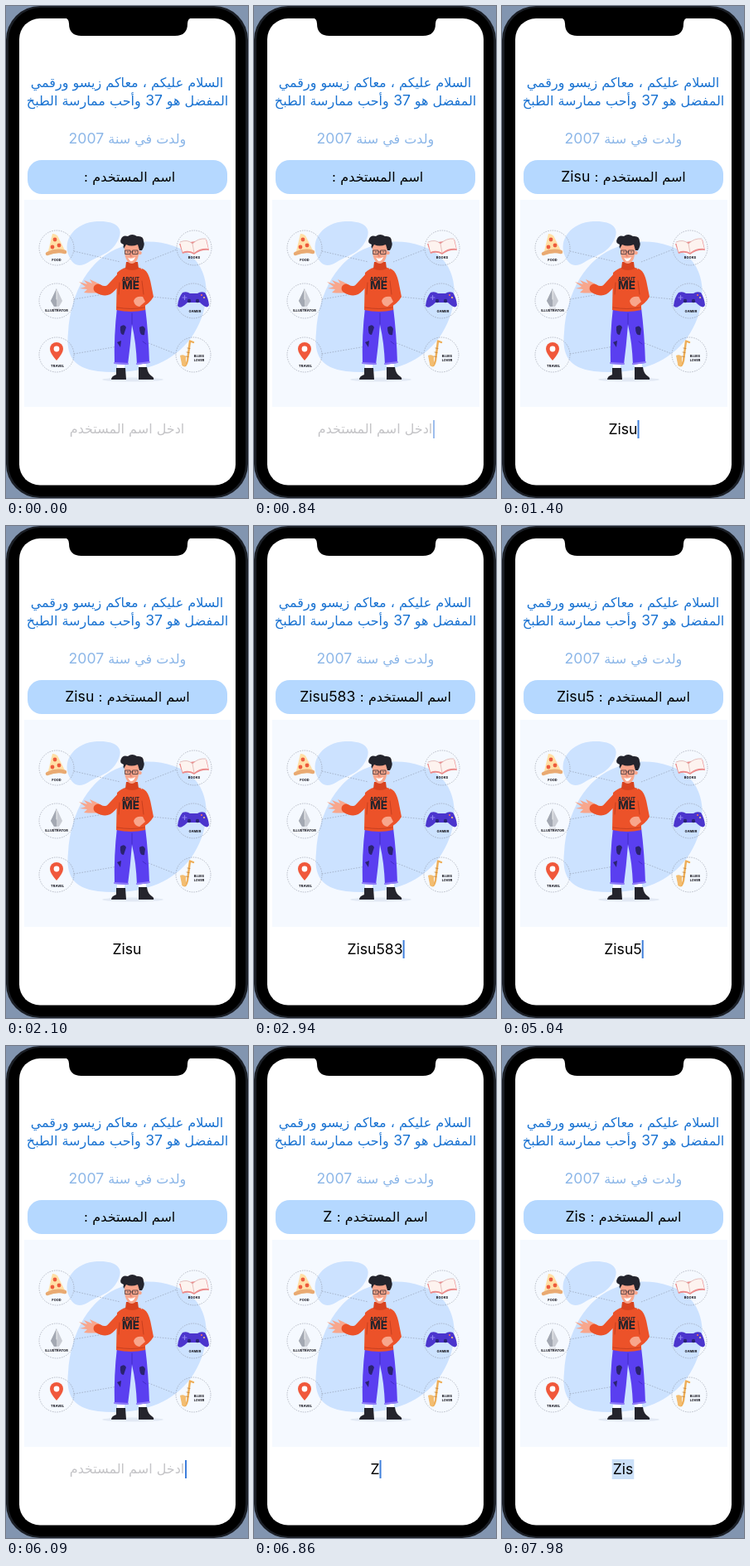
An HTML page with a canvas for the animation above (8 s loop, 292 px wide and 594 px high).

```html
<!DOCTYPE html>
<html lang="ar">
<head>
<meta charset="utf-8">
<style>
html, body { margin: 0; width: 100%; height: 100%; overflow: hidden; background: #000; }
canvas { display: block; width: 292px; height: 594px; }
</style>
</head>
<body>
<canvas id="stage"></canvas>
<script>
const W = 292, H = 594, LOOP = 8000, STEP = 70;
const canvas = document.getElementById('stage');
const ctx = canvas.getContext('2d');
const scale = window.devicePixelRatio || 1;
canvas.width = W * scale;
canvas.height = H * scale;

const LATIN = '17.6px Inter, "Liberation Sans", sans-serif';
const ARABIC = '16px "DejaVu Sans", sans-serif';
const INK = '#24242c', SKIN = '#f8a68c', RED = '#ec5229', BLUE = '#5a3ff0', PALE = '#cce2ff';

const USER = 'Zisu5831';
// [time, typed characters]
const TYPING = [
  [0, 0], [1190, 2], [1330, 3], [1400, 4], [2380, 5], [2520, 6], [2940, 7], [3150, 8],
  [4690, 7], [4900, 6], [5040, 5], [5180, 4], [5390, 3], [5530, 2], [5670, 1], [5810, 0],
  [6860, 1], [7070, 2], [7280, 3]
];
// [start, end, caret visible afterwards]
const FADES = [
  [140, 350, 1], [770, 980, 0], [1190, 1190, 1], [1890, 2100, 0], [2380, 2380, 1],
  [3640, 3850, 0], [4130, 4340, 1], [6370, 6510, 0], [6720, 6860, 1], [7560, 7560, 0]
];
const SELECT_AT = 7560;

function typedAt(t) {
  return USER.slice(0, TYPING.filter(([at]) => at <= t).pop()[1]);
}

function caretAt(t) {
  const fade = FADES.filter(([start]) => start <= t).pop();
  if (!fade) return 0;
  const [start, end, shown] = fade;
  const p = Math.min(1, (t - start + STEP) / (end - start + STEP));
  return shown ? p : 1 - p;
}

function box(x, y, w, h, r, color) {
  ctx.fillStyle = color;
  ctx.beginPath();
  ctx.roundRect(x, y, w, h, r);
  ctx.fill();
}

function fill(path, color) {
  ctx.fillStyle = color;
  ctx.fill(new Path2D(path));
}

function line(path, color, width = 1, dash = []) {
  ctx.strokeStyle = color;
  ctx.lineWidth = width;
  ctx.lineCap = ctx.lineJoin = dash.length ? 'butt' : 'round';
  ctx.lineJoin = 'round';
  ctx.setLineDash(dash);
  ctx.stroke(new Path2D(path));
  ctx.setLineDash([]);
}

function dot(x, y, r, color) {
  ctx.fillStyle = color;
  ctx.beginPath();
  ctx.arc(x, y, r, 0, Math.PI * 2);
  ctx.fill();
}

// Right-to-left line, centred, with Latin runs in their own font.
function mixedText(text, cx, y, color) {
  const runs = text.split(/([A-Za-z0-9]+)/).filter(Boolean).map(s => {
    const font = /[A-Za-z0-9]/.test(s) ? LATIN : ARABIC;
    ctx.font = font;
    return { s, font, w: ctx.measureText(s).width };
  });
  let right = cx + runs.reduce((sum, run) => sum + run.w, 0) / 2;
  ctx.fillStyle = color;
  ctx.direction = 'rtl';
  ctx.textAlign = 'right';
  for (const run of runs) {
    ctx.font = run.font;
    ctx.fillText(run.s, right, y);
    right -= run.w;
  }
}

function label(text, x, y, size = 4) {
  ctx.font = `800 ${size}px Inter, sans-serif`;
  ctx.direction = 'ltr';
  ctx.textAlign = 'center';
  ctx.fillStyle = INK;
  ctx.fillText(text, x, y);
}

function drawPhone() {
  ctx.fillStyle = '#8295b0';
  ctx.fillRect(0, 0, W, H);
  box(0, 0, 292, 594, 41, '#1b1f26');
  box(3, 2, 286, 590, 39, '#000');
  box(16, 15, 261, 563.5, 25, '#fff');
  fill('M70 14 Q76 15 76 21 Q76 36 91 36 H204 Q219 36 219 21 Q219 15 225 14 Z', '#000');
}

function drawBadges() {
  line('M82 296 L138 309 M82 354 L118 348 M82 420 L135 411 M168 309 L206 294 M176 351 L206 354 M172 407 L205 420',
    '#8c95a8', .6, [1.6, 1.6]);
  ctx.strokeStyle = '#8d93a0';
  ctx.lineWidth = .6;
  ctx.setLineDash([1.5, 1.3]);
  for (const [x, y] of [[61, 292], [61, 356], [61, 421], [227, 292], [226, 356], [226, 421]]) {
    ctx.beginPath();
    ctx.arc(x, y, 21, 0, Math.PI * 2);
    ctx.stroke();
  }
  ctx.setLineDash([]);

  fill('M56 275 Q61 275 63 279 L72 297 L50 300 Z', '#ffdfa6');
  line('M50 299 Q61 294 71 297', '#e9aa72', 4.5);
  for (const [x, y] of [[59, 282], [64, 289], [56, 291]]) dot(x, y, 2.4, '#ee5a3c');
  label('FOOD', 61, 308);

  fill('M61 341 L68 356 L64 363 H58 L54 356 Z', '#c9ccd3');
  fill('M61 341 L54 356 L58 363 H61 Z', '#a3a8b2');
  fill('M57 364 H65 V367 H57 Z', '#dfe1e6');
  line('M61 343 V354', '#fff', .8);
  label('ILLUSTRATOR', 61, 368.5);

  fill('M61 428 Q53 419 53 414 A8 8 0 0 1 69 414 Q69 419 61 428 Z', '#f0583b');
  dot(61, 414, 3.4, '#fff');
  label('TRAVEL', 62, 436);

  fill('M209 287 L213 299 Q221 296 227 300 Q235 294 245 295 L242 282 Z', '#ec8b8b');
  fill('M210 285 Q219 281 225 287 Q232 280 241 281 L244 293 Q234 292 227 298 Q220 294 213 297 Z', '#fdf3ef');
  line('M225 287 L227 298 M210 285 Q219 281 225 287 Q232 280 241 281', '#dba7a2', .7);
  label('BOOKS', 227, 304.5);

  fill('M213 346 Q218 344 222 347 H231 Q235 344 240 346 Q244 352 245 361 Q243 367 234 358 H219 Q210 367 207 362 Q208 352 213 346 Z', '#4b35cd');
  line('M213 352 H218 M215.5 349.5 V354.5', '#8d82f0', 1.2);
  dot(221, 356, 2.2, '#292474');
  dot(231, 356, 2.2, '#292474');
  dot(236, 349, 1, '#ff705a');
  dot(239, 352, 1, '#ffd06b');
  label('GAMER', 228, 370);

  line('M226 406 L222 404.5 L219 428 Q217 437 213.5 433 L213 426', '#eeae58', 2.4);
  fill('M210 422 Q214 420 217 423 L217 433 Q213 438 212 432 Z', '#f3bd70');
  line('M219 413 L222 413.5 M218 418 L221 418.5 M217 423 L220 423.5', '#c08238', .8);
  label('BLUES', 233, 423.5, 3.8);
  label('LOVER', 233, 428.5, 3.8);
}

function drawMan() {
  ctx.fillStyle = '#e2e9f4';
  ctx.beginPath();
  ctx.ellipse(153, 451, 37, 2.5, 0, 0, Math.PI * 2);
  ctx.fill();

  // legs and boots
  fill('M134 433 H143 V440 H134 Z M160 432 H169 V440 H160 Z', '#fff');
  fill('M134 364 H168 Q172 396 173 431 L158 433 Q157 406 152 385 Q150 410 147 433 L131 432 Q130 398 134 364 Z', BLUE);
  line('M131 431 L147 432 M158 432 L173 430', '#8f7cf7', 2);
  fill('M138 387 Q143 383 145 388 L142 397 Q137 397 138 387 Z M161 388 Q166 384 168 390 L167 397 Q161 399 161 388 Z M134 406 L139 404 L138 412 Z', '#2a2370');
  line('M152 371 L152 384 M165 405 L169 408', '#3c28b8', .8);
  fill('M133 437 H144 L145 451 H127 Q127 447 133 445 Z', INK);
  fill('M160 436 H170 Q171 444 176 447 Q179 449 178 451 H160 Z', INK);

  // arms and sweater
  fill('M113 336 Q106 332 101 330 L104 335 L94 331 L98 336 L88 333 L96 339 L89 341 L98 342 L94 346 Q104 347 112 346 Z', SKIN);
  line('M111 341 Q121 347 127 340 L140 326', RED, 11);
  fill('M164 317 Q172 319 175 336 L178 351 Q173 360 162 365 L156 359 L168 349 L163 335 Z', RED);
  fill('M134 322 Q139 317 147 315 H158 Q166 317 168 324 L168 367 Q151 371 133 367 Z', RED);
  fill('M145 309 H159 L160 317 Q152 321 144 317 Z', '#d8431f');
  fill('M165 351 Q156 350 154 356 Q155 362 161 363 L168 357 Z', SKIN);
  line('M164 332 L166 348 M137 334 L136 348 M134 364 Q151 367 167 364', '#bd3a1c', .8);
  label('ABOUT', 150.5, 331.5, 5.8);
  label('ME', 150.5, 342, 13.5);

  // head
  fill('M143 288 Q142 303 147 309 Q153 314 158 307 Q161 301 161 288 Z', SKIN);
  dot(161.5, 298, 2.3, SKIN);
  fill('M142 293 Q141 290 142 288 Q136 286 139 281 Q141 276 147 278 Q152 274 158 278 Q166 277 166 284 Q168 289 164 295 L161 295 L159 288 Q151 291 145 288 Z', INK);
  line('M144 295 H150 V299.5 H144 Z M153 295 H159 V299.5 H153 Z M150 297 H153', INK, .7);
  dot(147, 297, .7, INK);
  dot(156, 297, .7, INK);
  line('M151 298 L149.8 302 H152', '#d9705e', .8);
  fill('M147 304 Q152 306 156 303 Q154 309 150 308 Z', '#fff');
}

function drawCard() {
  ctx.fillStyle = '#f5f9ff';
  ctx.fillRect(22, 234, 250, 250);
  fill('M76 302 C67 282 84 261 110 260 C133 259 143 268 135 283 C127 299 113 301 100 309 C89 316 81 314 76 302 Z', PALE);
  fill('M139 291 C166 279 207 284 227 305 C250 330 244 372 223 401 C199 434 156 446 111 441 C81 437 72 422 75 394 C78 345 101 304 139 291 Z', PALE);
  drawBadges();
  drawMan();
}

function drawField(t, name) {
  ctx.font = LATIN;
  const width = ctx.measureText(name).width;
  const end = name ? 146 + width / 2 : 216;
  if (t >= SELECT_AT) {
    ctx.fillStyle = '#cbe0f8';
    ctx.fillRect(146 - width / 2 - 1, 499, width + 2, 24);
  }
  if (name) mixedText(name, 146, 517, '#000');
  else mixedText('ادخل اسم المستخدم', 146, 516, '#c4c4c7');
  ctx.globalAlpha = caretAt(t);
  ctx.fillStyle = '#3f7fdb';
  ctx.fillRect(end, 500, 2, 22);
  ctx.globalAlpha = 1;
}

function draw(t) {
  ctx.setTransform(scale, 0, 0, scale, 0, 0);
  const name = typedAt(t);
  drawPhone();
  mixedText('السلام عليكم ، معاكم زيسو ورقمي', 146, 98, '#1a73d2');
  mixedText('المفضل هو 37 وأحب ممارسة الطبخ', 146.5, 120, '#1a73d2');
  mixedText('ولدت في سنة 2007', 146.5, 166, '#8bb6e8');
  box(26, 186, 241, 41, 17, '#b5d8ff');
  mixedText('اسم المستخدم : ' + name, 146.5, 212, '#000');
  drawCard();
  drawField(t, name);
}

let shown = -1;
function tick() {
  const t = Math.floor(performance.now() % LOOP / STEP) * STEP;
  if (t !== shown) draw(shown = t);
  requestAnimationFrame(tick);
}
tick();
</script>
</body>
</html>
```
